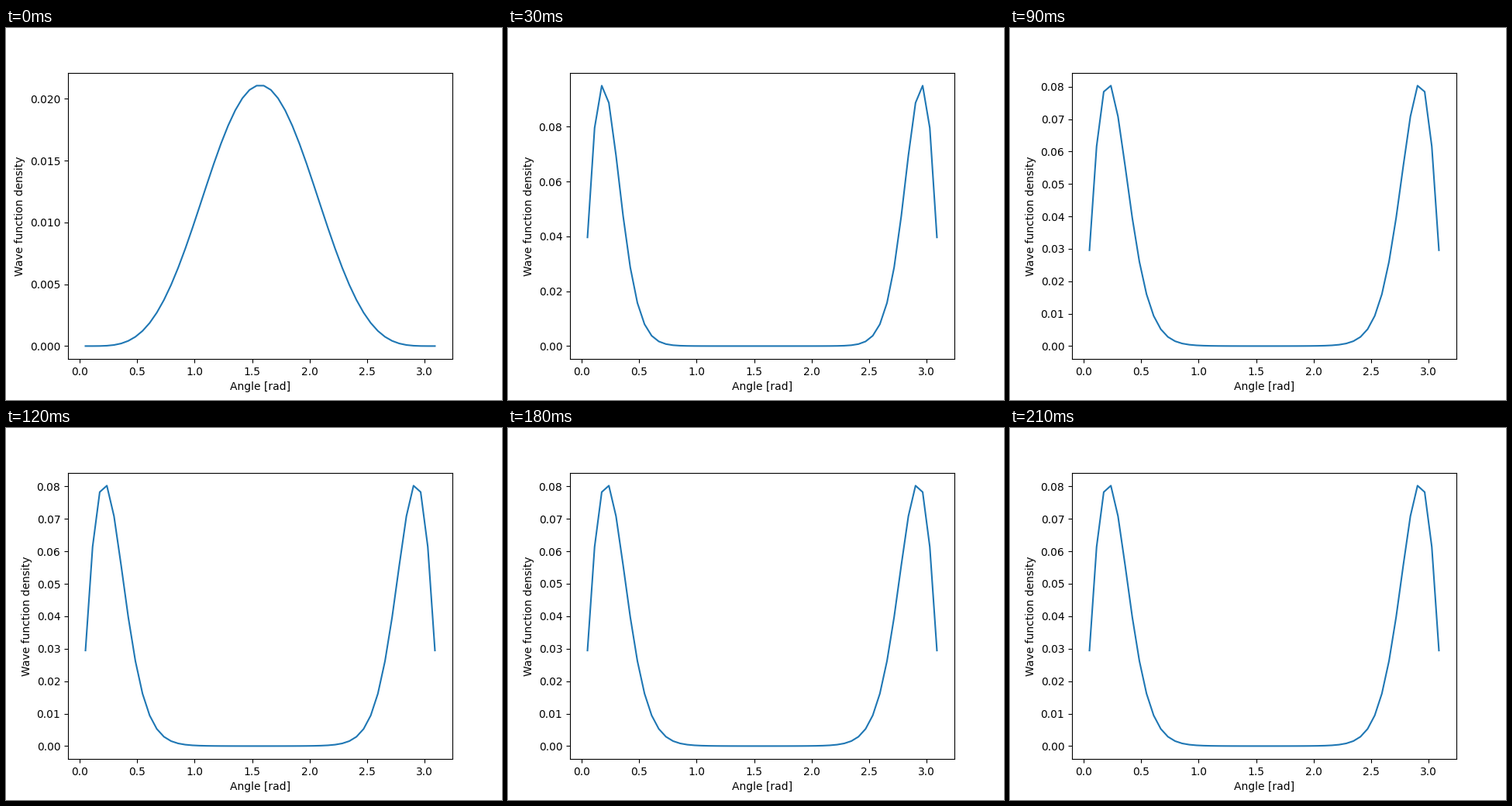
Animation of 640x480 px, one loop 1.95 s. Source, as a matplotlib script:

```python
import numpy as np
import matplotlib.pyplot as plt
from matplotlib.animation import FuncAnimation

INTERVAL = 30
FRAMES = 65
LAST_STEP = 7
POINTS = 50

angle = np.linspace(0.05, np.pi - 0.05, POINTS)
index = np.arange(POINTS)
is_end = (index == 0) | (index == POINTS - 1)


def scaled(shape, peak):
    return peak * shape / shape.max()


def density(step):
    """Trial density at step 0, then a polar density relaxing to its limit."""
    if step == 0:
        return scaled(np.sin(np.pi * index / (POINTS - 1)) ** 4, 0.02107)
    sharpness = 11.14 + 3.76 * 0.122 ** (step - 1)
    peak = 0.08022 + 0.01478 * 0.0846 ** (step - 1)
    sine = np.sin(angle)
    shape = sine * np.exp(-sharpness * sine**2)
    shape[is_end] *= 0.96  # grid ends sit slightly low
    return scaled(shape, peak)


fig, ax = plt.subplots(figsize=(6.4, 4.8), dpi=100)
line, = ax.plot(angle, density(0))
ax.set_xlabel("Angle [rad]")
ax.set_ylabel("Wave function density")


def update(frame):
    line.set_ydata(density(min(frame, LAST_STEP)))
    ax.relim()
    ax.autoscale_view()
    return (line,)


animation = FuncAnimation(fig, update, frames=FRAMES, interval=INTERVAL,
                          repeat=True, repeat_delay=0, blit=False)
plt.show()
```
